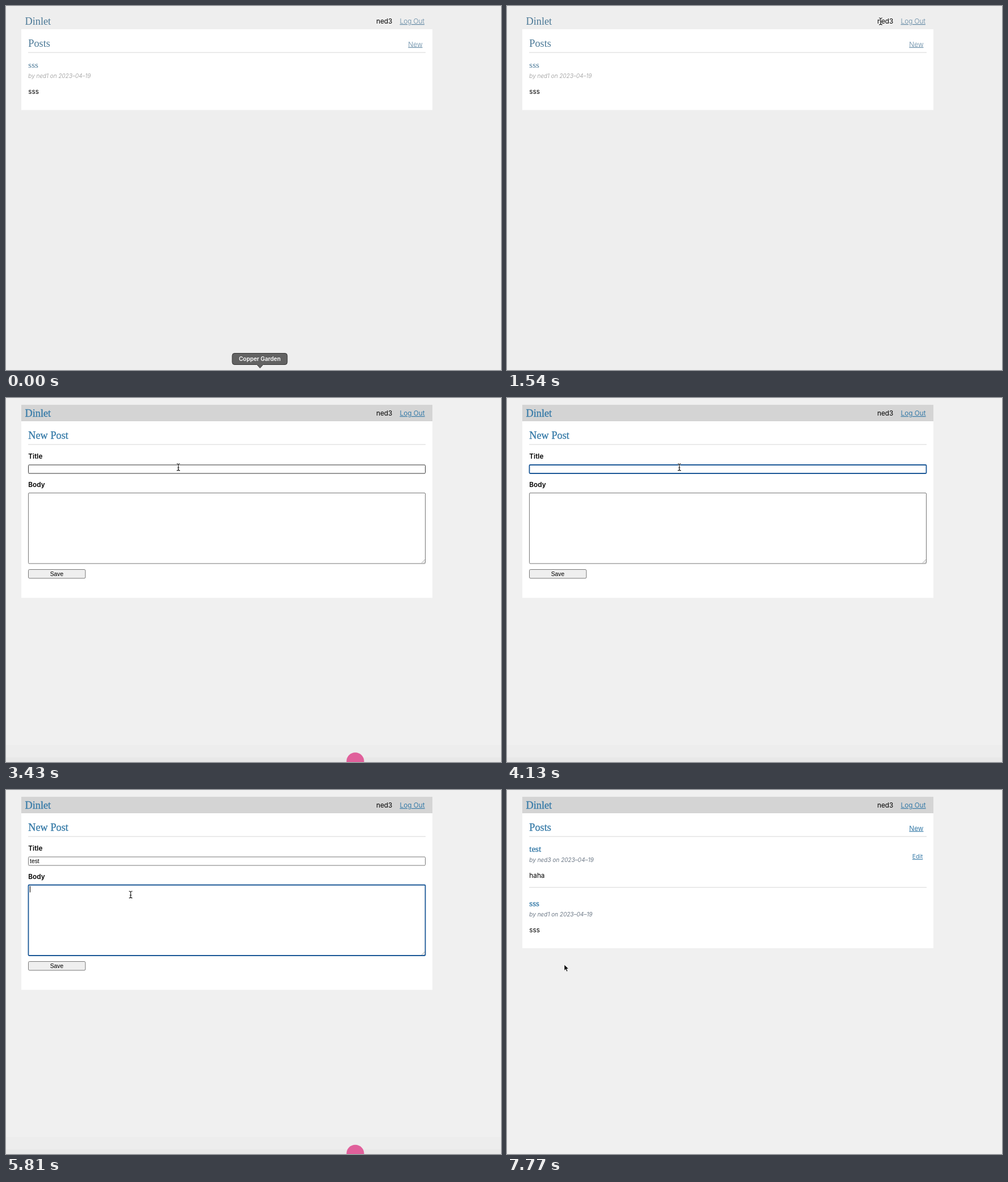
Write an HTML page that moves like this. It is 873x642 px and loops after 8 s.

```html
<!DOCTYPE html>
<html lang="en">
<head>
<meta charset="utf-8">
<title>Blog post</title>
<style>
html, body { margin: 0; width: 100%; height: 100%; overflow: hidden; background: #f0f0f0; }
svg { display: block; width: 873px; height: 642px; }
text { font: 11.8px Inter, "Liberation Sans", sans-serif; white-space: pre; }
.h { font: 18.3px "Liberation Serif", serif; fill: #377ba8; stroke: #377ba8; stroke-width: .35px; }
.post { font-size: 15px; }
.link { fill: #377ba8; text-decoration: underline; }
.edit { font-size: 10.4px; }
.by { font-size: 10px; font-style: italic; fill: #6c7886; }
.label { font-weight: 600; }
.field { font: 10.4px "Liberation Sans", Arial, sans-serif; }
.area { font: 10px "Liberation Mono", monospace; stroke: #000; stroke-width: .2px; }
.tip { font-size: 10px; font-weight: 600; fill: #fff; }
.pale .h { fill: #4a7896; stroke: none; }
.pale .link { fill: #5f86a2; font-weight: 300; }
.pale .by { fill: #929292; font-weight: 300; }
</style>
</head>
<body>
<svg id="stage" viewBox="0 0 873 642"></svg>
<script>
const stage = document.getElementById('stage');
const $ = id => document.getElementById(id);
const text = (x, y, cls, str, id = '') => `<text x="${x}" y="${y}" class="${cls}" id="${id}">${str}</text>`;
const rect = (x, y, w, h, fill, more = '') => `<rect x="${x}" y="${y}" width="${w}" height="${h}" fill="${fill}" ${more}/>`;
const rule = y => rect(39, y, 701, 1, '#d8d8d8');
const frame = (y, h, id) => rect(39.5, y, 700, h, '#fff', `id="${id}" rx="1.5"`);

const page = (bottom, bar, title) =>
  rect(27, 12, 725, 29, bar) + rect(27, 41, 725, bottom - 41, '#fff') +
  text(33.5, 32.5, 'h', 'Dinlet') + text(653, 31, '', 'ned3') +
  text(694.5, 31, 'link', 'Log Out') + text(39.3, 72, 'h', title) + rule(81.5);

const post = (top, title, author, body) =>
  text(39.3, top, 'h post', title) +
  text(39.3, top + 18, 'by', `by ${author} on 2023–04–19`) +
  text(39.3, top + 46, '', body);

const newLink = text(709.3, 71.5, 'link', 'New');

stage.innerHTML = `
<g id="before" class="pale">
  ${rect(0, 0, 873, 642, '#eee')}
  ${page(183.5, '#eee', 'Posts')}${newLink}${post(109, 'sss', 'ned1', 'sss')}
  <g id="tip">
    <path d="M403 612.5h89a4 4 0 0 1 4 4v12a4 4 0 0 1-4 4h-38.500l-5.500 6-5.500-6h-39.500a4 4 0 0 1-4-4v-12a4 4 0 0 1 4-4z" fill="#626262" stroke="#333"/>
    <text x="447.500" y="626" class="tip" text-anchor="middle">Copper Garden</text>
  </g>
</g>
<g id="form">
  ${rect(0, 612, 873, 22, '#ededed')}${rect(0, 634, 873, 8, '#e8e8e8')}
  ${page(352.5, '#d4d4d4', 'New Post')}
  ${text(39.3, 107, 'label', 'Title')}${frame(118, 15, 'titleBox')}
  ${text(39.3, 157, 'label', 'Body')}${frame(167.5, 124.5, 'bodyBox')}
  <path d="M733 291l6-6M736.500 291l2.500-2.500" stroke="#888" stroke-width=".8"/>
  ${rect(39.5, 302.5, 100.5, 15.5, '#efefef', 'rx="2" stroke="#767676"')}
  <text x="89.500" y="313.700" class="field" text-anchor="middle">Save</text>
  ${text(42, 129, 'field', '', 'titleText')}${text(42, 178, 'area', '', 'bodyText')}
  ${rect(0, 0, 1, 11, '#000', 'id="caret"')}
  <circle id="app" cx="616" r="15.500" fill="#e0609b"/>
</g>
<g id="after">
  ${page(279, '#d4d4d4', 'Posts')}${newLink}${post(109, 'test', 'ned3', 'haha')}
  ${text(714.8, 121, 'link edit', 'Edit')}${rule(171.3)}${post(205.3, 'sss', 'ned1', 'sss')}
</g>
<g id="pointer">
  <path id="arrow" d="M0 0v10.500l2.500-2.200 1.700 3.900 1.900-.8-1.700-3.800h3.400z" fill="#000" stroke="#fff" stroke-width=".7"/>
  <g id="beam" fill="none">
    <path d="M-3-6q3 0 3 2q0-2 3-2M0-4v8M-3 6q3 0 3-2q0 2 3 2M-1.500 1h3" stroke="#fff" stroke-width="2.400"/>
    <path d="M-3-6q3 0 3 2q0-2 3-2M0-4v8M-3 6q3 0 3-2q0 2 3 2M-1.500 1h3" stroke="#111" stroke-width="1.100"/>
  </g>
</g>`;

const LOOP = 8000, FORM = 2870, DONE = 7770, FOCUS_TITLE = 3500, FOCUS_BODY = 5740;
const titleKeys = [4410, 4970, 5110, 5180];
const bodyKeys = [6370, 6440, 6510, 6580];

// pointer stops: time, x, y
const stops = [
  [70, 449, 642], [490, 474, 390], [630, 476, 384], [1050, 716, 16], [1400, 661, 26],
  [1540, 659, 27], [1750, 659, 27], [2310, 728, 69], [3010, 728, 69], [3430, 304, 122],
  [5320, 304, 122], [5740, 222, 184], [5950, 214, 186], [6800, 177, 222],
  [6930, 177, 222], [7560, 101, 308]
];

const show = (id, on) => $(id).style.display = on ? '' : 'none';
const typed = (word, keys, t) => word.slice(0, keys.filter(k => k <= t).length);
const hop = (t, start, end, height) => {
  const u = (t - start) / (end - start);
  return u > 0 && u < 1 ? 4 * u * (1 - u) * height : 0;
};

function pointerAt(t) {
  const i = stops.findIndex(s => s[0] > t);
  if (i < 0) return stops[stops.length - 1].slice(1);
  if (i === 0) return [449, 660];
  const [t0, x0, y0] = stops[i - 1], [t1, x1, y1] = stops[i];
  let u = (t - t0) / (t1 - t0);
  u = u * u * (3 - 2 * u);
  return [x0 + (x1 - x0) * u, y0 + (y1 - y0) * u];
}

function outline(id, focused, idle) {
  $(id).setAttribute('stroke', focused ? '#1a5796' : idle);
  $(id).setAttribute('stroke-width', focused ? 1.8 : 1);
}

function drawForm(t) {
  const inBody = t >= FOCUS_BODY;
  outline('titleBox', t >= FOCUS_TITLE && !inBody, t < FOCUS_TITLE ? '#333' : '#767676');
  outline('bodyBox', inBody, '#767676');
  $('titleText').textContent = typed('test', titleKeys, t);
  $('bodyText').textContent = typed('haha', bodyKeys, t);

  const active = $(inBody ? 'bodyText' : 'titleText');
  const wakes = [FOCUS_TITLE, ...titleKeys, FOCUS_BODY, ...bodyKeys].filter(k => k <= t);
  const since = t - wakes[wakes.length - 1];
  show('caret', wakes.length && Math.floor(since / 500) % 2 === 0);
  $('caret').setAttribute('x', 42 + (active.textContent ? active.getComputedTextLength() : 0));
  $('caret').setAttribute('y', inBody ? 169.5 : 120);

  const lift = hop(t, 3010, 3950, 17.5) + hop(t, 5080, 5920, 37);
  $('app').setAttribute('cy', 658 - lift);
}

function draw(t) {
  const form = t >= FORM && t < DONE;
  show('before', t < FORM);
  show('form', form);
  show('after', t >= DONE);
  show('tip', t < 140);
  if (form) drawForm(t);

  const [x, y] = pointerAt(t);
  const overText = form
    ? x > 39 && x < 740 && (y > 117 && y < 134 || y > 167 && y < 293)
    : x > 652 && x < 683 && y > 18 && y < 36;
  const hidden = t >= titleKeys[0] && t < 5320 || t >= bodyKeys[0] && t < 6930;
  show('pointer', !hidden);
  show('beam', overText);
  show('arrow', !overText);
  $('pointer').setAttribute('transform', `translate(${x} ${y})`);
}

const begin = performance.now();
function tick() {
  draw((performance.now() - begin) % LOOP);
  requestAnimationFrame(tick);
}
tick();
</script>
</body>
</html>
```
